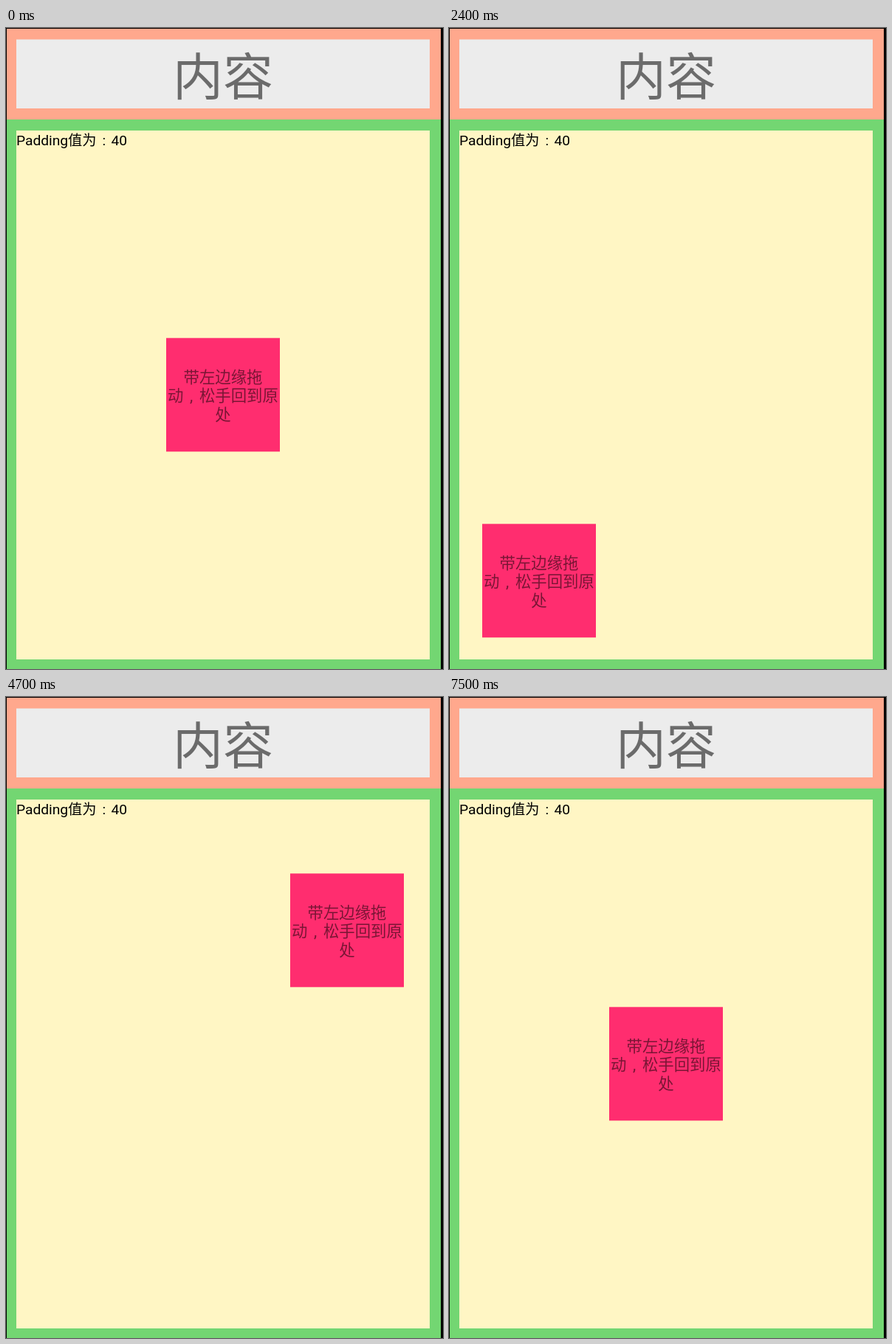
These frames come from a looping animation (592 by 869 pixels, 8000 ms). An HTML page:

```html
<!DOCTYPE html>
<html lang="zh-CN">
<head>
<meta charset="utf-8">
<title>拖动回弹</title>
<style>
  html, body { margin: 0; width: 100%; height: 100%; overflow: hidden; background: #000; }
  svg { display: block; width: 592px; height: 869px; }
  text { font-family: Roboto, "Noto Sans CJK SC", "Noto Sans CJK", sans-serif; white-space: pre; }
  .title { font-size: 68px; fill: #6b6b6b; text-anchor: middle; }
  .info { font-size: 19.2px; fill: #000; }
  .label { font-size: 21.4px; fill: #000; fill-opacity: .52; text-anchor: middle; }
</style>
</head>
<body>
<svg viewBox="0 0 592 869">
  <rect width="592" height="869" fill="#000"/>
  <rect x="1" y="1" width="588" height="123" fill="#ffa88d"/>
  <rect x="14" y="15.5" width="560" height="93.5" fill="#ececec"/>
  <text class="title" x="294" y="91">内容</text>
  <rect x="1" y="124" width="588" height="745" fill="#73d672"/>
  <rect x="14" y="139" width="560" height="717" fill="#fff6c4"/>
  <g class="info">
    <text x="14" y="159">Padding值为</text>
    <text x="130.5" y="159">:</text>
    <text x="142.5" y="159">40</text>
  </g>
  <g id="box">
    <rect width="154" height="154" y=".3" height="153.7" fill="#ff2d6f"/>
    <g class="label">
      <text x="77" y="61">带左边缘拖</text>
      <text x="12.7" y="86.3">动</text>
      <text x="34" y="86.3">,</text>
      <text x="98.4" y="86.3">松手回到原</text>
      <text x="77" y="111.6">处</text>
    </g>
  </g>
</svg>
<script>
  const LOOP = 8000, STEP = 100, HOME = [217, 420];
  const box = document.getElementById('box');

  // Each drag: first step time, its points, then release time and settle duration.
  const drags = [
    { at: 600, path: [[208, 404], [163, 345], [96, 264], [70, 205], [52, 178], [45, 170]], release: 1391, settle: 513 },
    { at: 2100, path: [[216, 438], [207, 516], [108, 672], [45, 672]], release: 2534, settle: 625 },
    { at: 3300, path: [[251, 430], [316, 567], [389, 672]], release: 3674, settle: 513 },
    { at: 4400, path: [[261, 406], [302, 345], [355, 262], [385, 239]], release: 4791, settle: 513 },
    { at: 5900, path: [[237, 385], [291, 345], [291, 262], [338, 305], [355, 406], [330, 445], [275, 465],
                       [255, 508], [303, 573], [350, 560], [385, 515], [389, 460]], release: 7088, settle: 513 }
  ];

  function position(time) {
    const drag = drags.findLast(d => time >= d.at);
    if (!drag) return HOME;
    const index = Math.min((time - drag.at) / STEP, drag.path.length - 1);
    const point = drag.path[index];
    if (time < drag.release) return point;
    const left = Math.max(0, 1 - (time - drag.release) / drag.settle) ** 5;
    return HOME.map((h, i) => Math.round(h + (point[i] - h) * left));
  }

  function draw() {
    const time = Math.floor(performance.now() % LOOP / STEP) * STEP;
    box.setAttribute('transform', `translate(${position(time)})`);
    requestAnimationFrame(draw);
  }
  draw();
</script>
</body>
</html>
```
